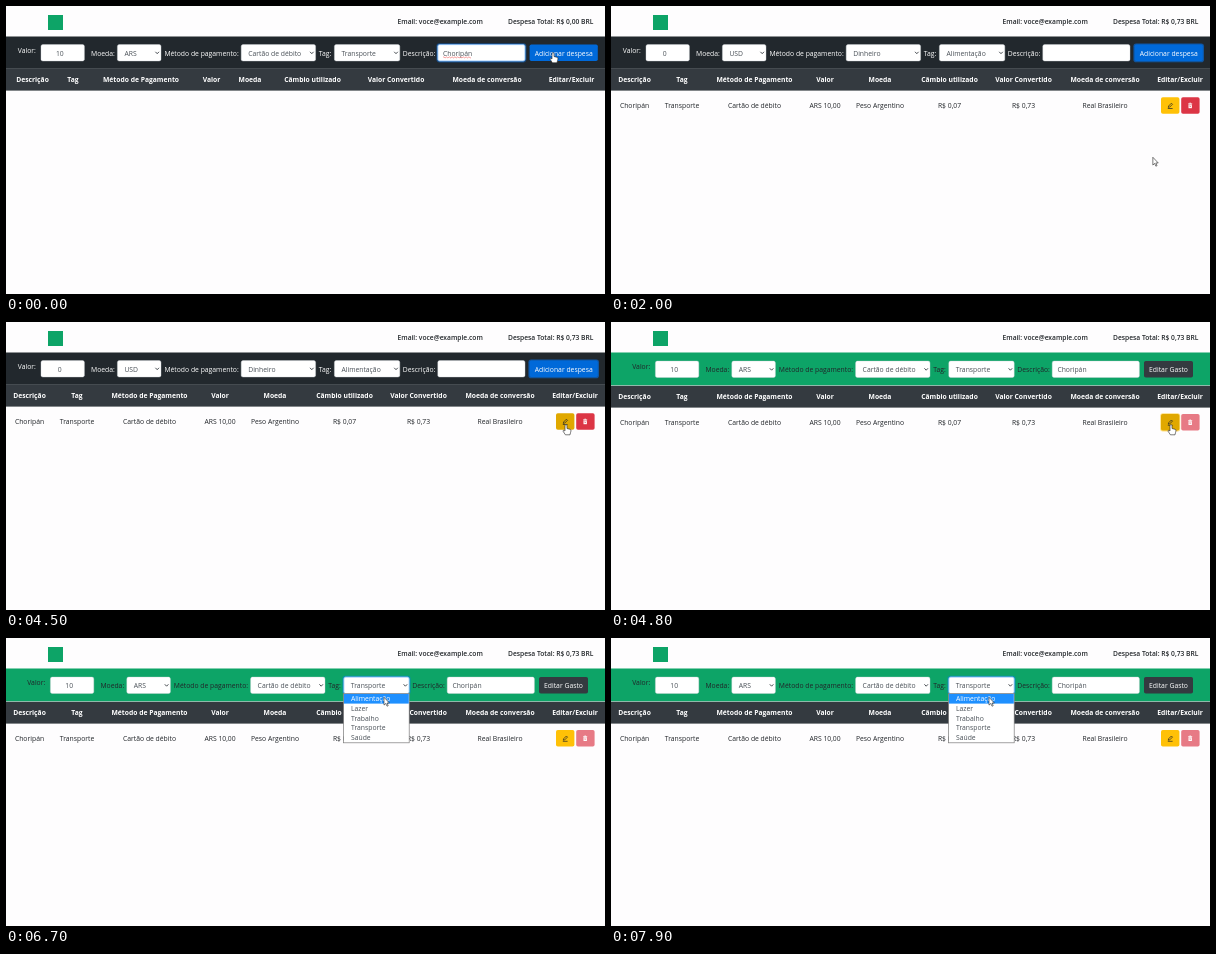
These frames come from a looping animation (599 by 288 pixels, 8000 ms). An HTML page:

```html
<!DOCTYPE html>
<html lang="pt-BR">
<head>
<meta charset="utf-8">
<title>Despesas</title>
<style>
html, body { margin: 0; width: 100%; height: 100%; overflow: hidden; background: #fefdfe; }
svg { display: block; width: 599px; height: 288px; }
text { font-family: "Open Sans", "Noto Sans", sans-serif; font-size: 6.8px; white-space: pre; }
</style>
</head>
<body>
<svg id="stage" viewBox="0 0 599 288" xmlns="http://www.w3.org/2000/svg"></svg>
<script>
const LOOP = 8000, STEP = 100;
const SAVED = 300, EDIT = 4700, OPEN = 6400;
const INK = '#212529', GREY = '#495057', GREEN = '#0da467', BAR = '#343a40';

const text = (x, y, s, fill = INK, extra = '') =>
  `<text x="${x}" y="${y}" fill="${fill}" ${extra}>${s}</text>`;
const mid = (x, y, s, fill, extra = '') => text(x, y, s, fill, `text-anchor="middle" ${extra}`);
const rect = (x, y, w, h, fill, extra = '') =>
  `<rect x="${x}" y="${y}" width="${w}" height="${h}" fill="${fill}" ${extra}/>`;
const group = (id, body, extra = '') => `<g id="${id}" ${extra}>${body}</g>`;

const field = (x, w, s, dx = 7) =>
  rect(x, 38.6, w, 16.4, '#fff', 'rx="1.8" stroke="#ced4da" stroke-width=".4"') + text(x + dx, 49.6, s, GREY);
const select = (x, w, s) => field(x, w, s) +
  `<path d="M${x + w - 5.6} 45.8l1.8 1.9 1.8-1.9" fill="none" stroke="${BAR}" stroke-width=".9"/>`;
const glow = (id, x, w) => group(id,
  rect(x - .7, 37.9, w + 1.4, 17.8, 'none', 'rx="2.4" stroke="#007bff" stroke-opacity=".4" stroke-width="1.4"') +
  rect(x, 38.6, w, 16.4, 'none', 'rx="1.8" stroke="#80bdff" stroke-width=".7"'));

function controls(ink, [value, coin, method, tag, note]) {
  return text(11.8, 46.8, 'Valor:', ink) + field(35, 43.4, '') + mid(53.8, 49.6, value, GREY) +
    text(85, 49.5, 'Moeda:', ink) + select(111.4, 43.6, coin) +
    text(158.4, 49.5, 'Método de pagamento:', ink) + select(235.2, 74.4, method) +
    text(312.8, 49.5, 'Tag:', ink) + select(328.4, 65.4, tag) +
    text(396.8, 49.5, 'Descrição:', ink) + field(431.8, 87.2, note, 5.2);
}

const titles = ['Descrição', 'Tag', 'Método de Pagamento', 'Valor', 'Moeda', 'Câmbio utilizado',
  'Valor Convertido', 'Moeda de conversão', 'Editar/Excluir'];
const cells = ['Choripán', 'Transporte', 'Cartão de débito', 'ARS 10,00', 'Peso Argentino',
  'R$ 0,07', 'R$ 0,73', 'Real Brasileiro'];
const wide = [26.5, 67, 135, 205.5, 244, 306.5, 390, 481, 565.5];
const full = [23.5, 71, 143.5, 214, 269, 338.5, 412.5, 494, 569];

const heads = xs => titles.map((s, i) =>
  mid(xs[i], 75.9, s, '#fff', 'font-weight="700" style="font-size:6.75px"')).join('');

const pencil = `<path d="M557.3 101.4l.3-1.4 2.8-2.8 1.1 1.1-2.8 2.8zM556.8 102.5h4.8" fill="none" stroke="${INK}" stroke-width=".7"/>`;
const bin = '<path d="M577.2 97.8h4M578.4 97.2h1.6" stroke="#fff" stroke-width=".8"/>' +
  '<path d="M577.5 98.5h3.4v3.7h-3.4z" fill="#fff"/>' +
  '<path d="M578.5 99.5l1.4 1.6M579.9 99.5l-1.4 1.6" stroke="#dc3545" stroke-width=".5"/>';

const row = cells.map((s, i) => mid(full[i], 102, s, INK)).join('') +
  rect(549.2, 90.4, 20, 18.2, '#ffc107', 'id="editRing" rx="2.6" opacity=".5"') +
  rect(550, 91.2, 18.4, 16.6, '#ffc107', 'id="editBtn" rx="1.8"') + pencil +
  group('del', rect(570.2, 91.2, 18.4, 16.6, '#dc3545', 'rx="1.8"') + bin);

const options = ['Alimentação', 'Lazer', 'Trabalho', 'Transporte', 'Saúde'];
const menu = rect(337.6, 55.4, 65.6, 49.4, '#fff', 'stroke="#7a7a7a" stroke-width=".7"') +
  rect(338, 56, 64.8, 9.6, '#1e90ff', 'id="pick"') +
  options.map((s, i) => text(345, 63.3 + i * 9.65, s, GREY, 'class="opt"')).join('');

const arrow = '<path d="M0 0V7.8L1.8 6.2 3 8.9 4.2 8.4 3 5.7H5.4Z" fill="#fff" stroke="#222" stroke-width=".6"/>';
const hand = '<path d="M-1 .8Q0-.6 1 .8V4l3 .8q1.2.3 1 1.6L4.5 8.2 4 10.3H-.6L-3 6.6q-.2-1.5 2-.2Z" fill="#fff" stroke="#222" stroke-width=".6"/>';
const beam = '<path d="M-1.5-3.4h1.1l.4.4.4-.4h1.1M0-3V3M-1.5 3.4h1.1l.4-.4.4.4h1.1" fill="none" stroke="#e8e8e8" stroke-width=".7"/>';

const bold = 'font-weight="600" style="font-size:6.7px"';
document.getElementById('stage').innerHTML =
  rect(0, 0, 599, 288, '#fefdfe') +
  rect(42, 9, 15, 15, GREEN) +
  text(391.5, 17.9, 'Email: voce@example.com', INK, bold) +
  text(502, 17.9, '', INK, `id="total" ${bold}`) +
  group('dark',
    rect(0, 30.5, 599, 32, '#22282d') +
    group('filled', controls('#fff', ['10', 'ARS', 'Cartão de débito', 'Transporte', 'Choripán']) +
      `<path d="M437 51.4q.7-1 1.4 0${'t1.4 0'.repeat(19)}" fill="none" stroke="#e33" stroke-width=".5"/>` +
      glow('noteGlow', 431.8, 87.2)) +
    group('blank', controls('#fff', ['0', 'USD', 'Dinheiro', 'Alimentação', ''])) +
    rect(522.4, 37.4, 70.6, 18.8, '#007bff', 'id="addRing" rx="2.8" opacity=".55"') +
    rect(523.6, 38.5, 68.2, 16.6, '#0069d9', 'rx="1.8"') +
    mid(557.7, 49.5, 'Adicionar despesa', '#fff')) +
  group('green',
    rect(0, 30.5, 599, 33.3, GREEN) + rect(0, 63.1, 599, .7, '#d5eae0') +
    group('editForm', controls(INK, ['10', 'ARS', 'Cartão de débito', 'Transporte', 'Choripán']) +
      glow('tagGlow', 328.4, 65.4) +
      rect(523.6, 38.5, 49, 16.6, BAR, 'rx="1.8"') +
      mid(548.1, 49.5, 'Editar Gasto', '#fff'), 'transform="translate(9.4 .5)"')) +
  rect(0, 62.2, 599, 22.4, BAR, 'id="bar"') +
  group('headWide', heads(wide)) + group('headFull', heads(full)) +
  group('row', row) + group('menu', menu) +
  group('cursor', group('arrow', arrow) + group('hand', hand) + group('beam', beam));

const $ = id => document.getElementById(id);
const show = (id, on) => $(id).setAttribute('display', on ? 'inline' : 'none');
const set = (id, attrs) => { for (const k in attrs) $(id).setAttribute(k, attrs[k]); };

// time, x, y of the pointer tip
const path = [
  [0, 547, 46.5], [1300, 547, 46.5], [1600, 514, 88], [1800, 530, 132], [2100, 546, 158],
  [2400, 552, 163], [2600, 552, 163], [2900, 555, 133.5], [3500, 559, 100], [4100, 559, 100],
  [4300, 560, 102.5], [4800, 560, 102.5], [5100, 505, 111], [5400, 420, 100], [5800, 326.5, 72],
  [6000, 352, 56], [6200, 397, 45], [6400, 397, 45], [6700, 378, 59.3], [LOOP, 378, 59.3]
];

function pointer(t) {
  const i = path.findIndex(p => p[0] > t);
  const [t0, x0, y0] = path[i - 1], [t1, x1, y1] = path[i];
  const u = (t - t0) / (t1 - t0), e = u * u * (3 - 2 * u);
  return [x0 + (x1 - x0) * e, y0 + (y1 - y0) * e];
}

function render(t) {
  const saved = t >= SAVED, edit = t >= EDIT, open = t >= OPEN;
  const [x, y] = pointer(t);
  const inside = (l, r, a, b) => x >= l && x <= r && y >= a && y <= b;
  const overEdit = saved && inside(550, 568.5, 91, 108);

  $('total').textContent = `Despesa Total: R$ ${saved ? '0,73' : '0,00'} BRL`;
  show('dark', !edit);
  show('green', edit);
  show('filled', !saved);
  show('blank', saved);
  show('noteGlow', t < 200);
  show('addRing', t >= 100);
  show('headWide', !saved);
  show('headFull', saved);
  show('row', saved);

  set('bar', { y: edit ? 63.8 : 62.2, height: edit ? 21.8 : 22.4 });
  set('headFull', { transform: `translate(0 ${edit ? 1.4 : 0})` });
  set('row', { transform: `translate(0 ${edit ? .8 : 0})` });
  const focused = edit && t < OPEN - 100;
  set('editBtn', { fill: overEdit || focused ? '#e0a800' : '#ffc107' });
  show('editRing', focused);
  set('del', { opacity: edit ? .65 : 1 });

  show('tagGlow', t >= OPEN - 100);
  show('menu', open);
  const pick = y > 55.5 ? 0 : 3;
  set('pick', { y: 56 + pick * 9.65 });
  document.querySelectorAll('.opt').forEach((o, i) => o.setAttribute('fill', i === pick ? '#fff' : GREY));

  const overAdd = !edit && inside(523, 592, 38, 55);
  const onText = edit && !open && inside(310, 367, 69, 78);
  show('hand', overAdd || overEdit);
  show('beam', onText);
  show('arrow', !(overAdd || overEdit || onText));
  set('cursor', { transform: `translate(${x.toFixed(2)} ${y.toFixed(2)})` });
}

const start = performance.now();
function tick() {
  const t = (performance.now() - start) % LOOP;
  render(Math.floor(t / STEP) * STEP);
  requestAnimationFrame(tick);
}
tick();
</script>
</body>
</html>
```
